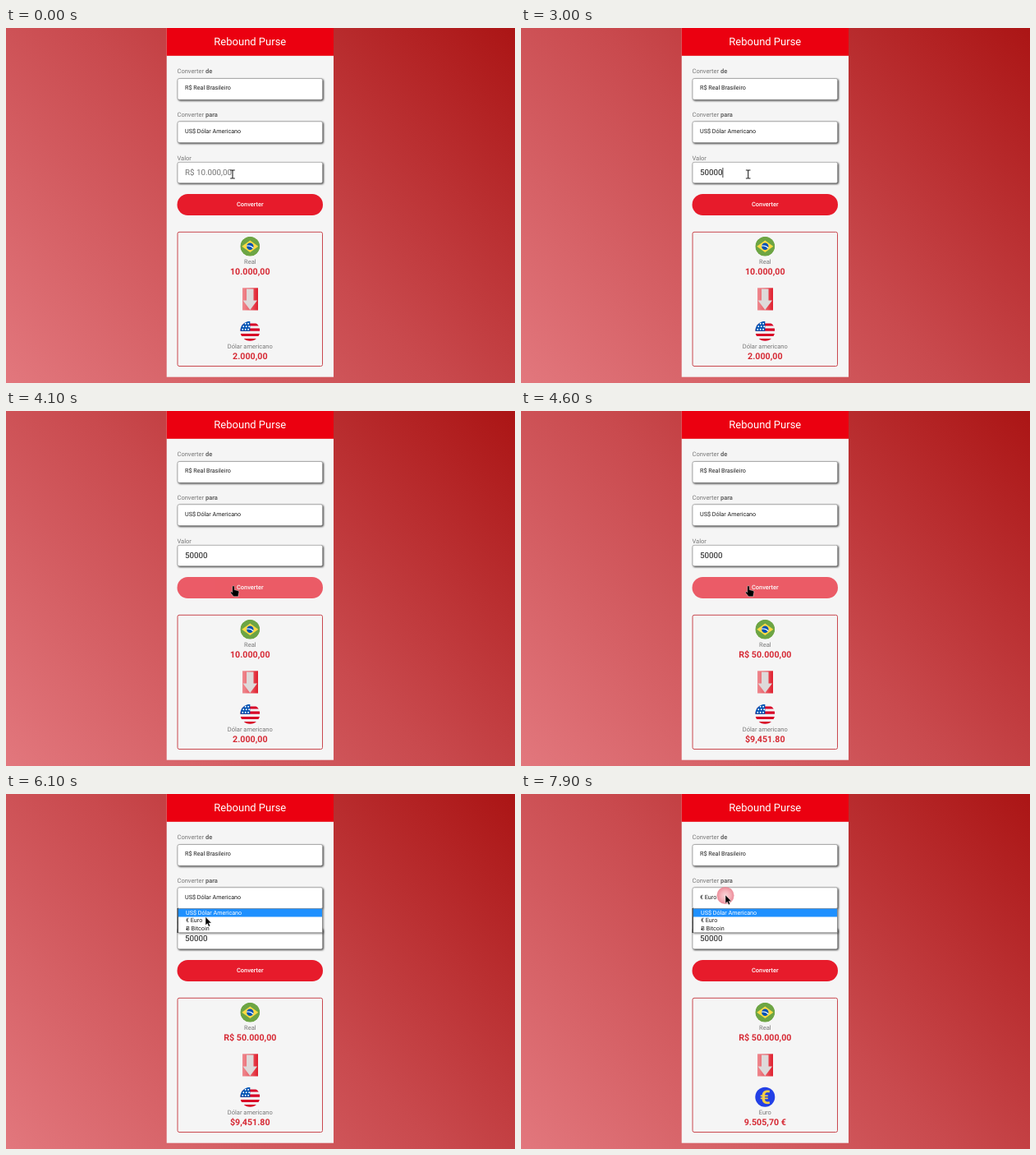
These frames come from a looping animation (620 px wide and 432 px high, 8000 ms). An HTML page:

```html
<!DOCTYPE html>
<html lang="pt-BR">
<head>
<meta charset="utf-8">
<title>Rebound Purse</title>
<style>
html, body { margin: 0; width: 100%; height: 100%; overflow: hidden; }
body { background: linear-gradient(45deg, #e2777d, #c94a4e 50%, #ab1515); }
svg { display: block; width: 620px; height: 432px; }
text { font-family: Roboto, sans-serif; text-rendering: geometricPrecision; }
.label { font-size: 7.5px; fill: #777; }
.label tspan { font-weight: 700; fill: #666; }
.choice { font-size: 7.2px; fill: #1c1c1c; }
.value { font-size: 9.8px; fill: #1c1c1c; }
.amount { font-size: 10.7px; font-weight: 700; fill: #d62a35; }
.mid { text-anchor: middle; }
.field { fill: #fff; stroke: #888; stroke-width: .6; filter: drop-shadow(1px 1px 1px rgba(0,0,0,.8)); }
</style>
</head>
<body>
<svg viewBox="0 0 620 432">
  <defs>
    <clipPath id="disc"><circle r="12"/></clipPath>
    <linearGradient id="arrowFill">
      <stop stop-color="#ef8a90"/><stop offset=".5" stop-color="#e9616a"/><stop offset="1" stop-color="#e01f2e"/>
    </linearGradient>
    <radialGradient id="rippleFill">
      <stop stop-color="#f9ced2"/><stop offset=".55" stop-color="#f3a5ae"/><stop offset="1" stop-color="#e97888"/>
    </radialGradient>
  </defs>

  <rect x="195.7" width="203.3" height="424.7" fill="#f5f5f5"/>
  <rect x="195.7" width="203.3" height="33.8" fill="#eb0010"/>
  <text class="mid" x="297.3" y="21.3" font-size="13" fill="#fff">Rebound Purse</text>

  <text class="label" x="208.5" y="55.3">Converter <tspan>de</tspan></text>
  <rect class="field" x="209" y="61.5" width="176.6" height="25.7" rx="2"/>
  <text class="choice" x="218" y="75.4">R$ Real Brasileiro</text>

  <text class="label" x="208.5" y="107.6">Converter <tspan>para</tspan></text>
  <rect class="field" x="209" y="113.8" width="176.6" height="25.7" rx="2"/>
  <text class="choice" id="target" x="218" y="128.2"></text>

  <text class="label" x="208.5" y="160.7">Valor</text>
  <rect class="field" x="209" y="163.3" width="176.6" height="25.4" rx="2"/>
  <text class="value" id="value" x="218" y="179.2"></text>
  <rect id="caret" y="170" width=".8" height="12" fill="#111"/>

  <g id="button">
    <rect x="208.5" y="202" width="177.5" height="26" rx="13" fill="#e71b2b"/>
    <text class="mid" x="297.3" y="217.3" font-size="7.4" font-weight="500" fill="#fff">Converter</text>
  </g>

  <rect x="209" y="248.3" width="176.5" height="163.2" rx="2" fill="none" stroke="#c9474e"/>
  <g transform="translate(297.3 265.8)" clip-path="url(#disc)">
    <circle r="12" fill="#6da544"/>
    <path d="M-10 0L0-7.2L10 0L0 7.2Z" fill="#ffda44"/>
    <circle r="4.2" fill="#0052b4"/>
    <path d="M-4.1-.6Q1-1.6 3.8 2" fill="none" stroke="#fff" stroke-width="1.2"/>
  </g>
  <text class="label mid" x="297.3" y="287.2">Real</text>
  <text class="amount mid" id="from" x="297.3" y="299.8"></text>

  <rect x="288" y="316.3" width="19" height="27.2" fill="url(#arrowFill)"/>
  <path d="M293 317.5H301.5V331.5H306L297.3 343L288.6 331.5H293Z" fill="#dedada"/>

  <g id="dollar" transform="translate(297.3 368.8)" clip-path="url(#disc)">
    <circle r="12" fill="#f2f2f2"/>
    <path d="M-12-7.8H12M-12-1.6H12M-12 4.7H12M-12 10.9H12" stroke="#d80027" stroke-width="3.2"/>
    <rect x="-12" y="-12" width="12" height="12" fill="#0052b4"/>
    <path id="stars" stroke="#fff" stroke-width="1.9" stroke-linecap="round"/>
  </g>
  <g id="euro" transform="translate(297.3 368.8)">
    <circle r="12" fill="#2340e6"/>
    <text class="mid" y="8.2" font-size="23" font-weight="700" fill="#f4cf45">€</text>
  </g>
  <text class="label mid" id="currency" x="297.3" y="390.2"></text>
  <text class="amount mid" id="to" x="297.3" y="402.6"></text>

  <g id="menu">
    <rect x="209.3" y="139.6" width="176" height="29.2" fill="#fff" stroke="#777" stroke-width=".6"
          style="filter:drop-shadow(1px 1px 1px rgba(0,0,0,.5))"/>
    <rect x="208.5" y="139" width="1.2" height="30" fill="#222"/>
    <rect id="marker" x="209.8" width="175.2" height="9.8" fill="#1e90ff"/>
    <text class="choice" x="219" y="147">US$ Dólar Americano</text>
    <text class="choice" x="219" y="156.4">€ Euro</text>
    <text class="choice" x="219" y="165.6">Ƀ Bitcoin</text>
  </g>

  <circle id="ripple" fill="url(#rippleFill)"/>
  <g id="cursor">
    <path id="beam" d="M-2.8-5H-.7L0-4.5L.7-5H2.8M0-4.5V4.5M-2.8 5H-.7L0 4.5L.7 5H2.8" fill="none" stroke="#222" stroke-width="1.1"/>
    <path id="hand" d="M-1.3 1Q0-.8 1.3 1V5L5.8 6.1Q7 6.5 6.8 8L6 11.3V13.2H.2L-3.4 8.6Q-3.6 7-2.2 7.2L-1.3 8.2Z" fill="#000" stroke="#fff" stroke-width=".4" transform="translate(0 .6)"/>
    <path id="arrow" d="M0 0V10.2L2.3 8.1L3.9 11.7L5.6 10.9L4.1 7.4H7.2Z" fill="#000" stroke="#fff" stroke-width=".4"/>
  </g>
</svg>
<script>
const LOOP = 8000, TICK = 100;
const el = {};
document.querySelectorAll('svg [id]').forEach(node => el[node.id] = node);

// Step tables: [start ms, value]
const typed = [[0, ''], [1400, '5'], [1800, '50'], [2000, '500'], [2300, '5000'], [2600, '50000']];
const pointer = [[0, 'beam'], [3400, 'arrow'], [3500, 'hand'], [5000, 'beam'], [5200, 'hand'],
  [5600, 'arrow'], [7000, 'beam'], [7500, 'hand'], [7800, 'arrow']];
const caretOn = [[0, false], [600, true], [3900, false]];
const menuOpen = [[0, false], [5600, true], [6900, false], [7800, true]];
const marked = [[0, 0], [6300, 1], [7800, 0]];
const results = [
  [0, { from: '10.000,00', to: '2.000,00' }],
  [4300, { from: 'R$ 50.000,00', to: '$9,451.80' }],
  [6900, { from: 'R$ 50.000,00', to: '9.505,70 €', euro: true }]
];
const clicks = [500, 4200, 5500, 6800, 7800];
const rippleSteps = [[6, .9], [10.5, .85], [13.5, .55], [16, .25]];

// Eased tracks: [ms, ...values]
const path = [[0, 276, 178], [2900, 276, 178], [3000, 276.7, 178], [3800, 277, 212], [4800, 277, 212],
  [5300, 245, 127], [5500, 247, 123], [5900, 247, 123], [6100, 243, 149.5], [6200, 243, 149.5],
  [6500, 242, 153], [6900, 242, 153], [7300, 316.5, 163.5], [7700, 249, 123], [8000, 249, 123]];
const buttonFade = [[0, 1], [3400, 1], [3700, .7], [4800, .7], [5100, 1], [8000, 1]];

const pick = (steps, t) => steps.filter(s => s[0] <= t).pop()[1];

function at(track, t) {
  const i = track.findIndex(k => k[0] > t);
  const a = track[i - 1], b = track[i];
  const p = (t - a[0]) / (b[0] - a[0]);
  const eased = p * p * (3 - 2 * p);
  return a.slice(1).map((v, n) => v + (b[n + 1] - v) * eased);
}

const show = (node, on) => node.style.display = on ? '' : 'none';

function set(node, attrs) {
  for (const name in attrs) node.setAttribute(name, attrs[name]);
}

let stars = '';
for (let row = 0; row < 3; row++)
  for (let col = 0; col < 3; col++)
    stars += `M${-9 + col * 3.4 + (row % 2)} ${-9 + row * 3.5}h.01`;
el.stars.setAttribute('d', stars);

function render(t) {
  const text = pick(typed, t);
  el.value.textContent = text || 'R$ 10.000,00';
  el.value.style.fill = text ? '' : '#757575';
  set(el.caret, { x: 218 + text.length * 5.5 });
  show(el.caret, pick(caretOn, t));

  const result = pick(results, t);
  el.from.textContent = result.from;
  el.to.textContent = result.to;
  el.currency.textContent = result.euro ? 'Euro' : 'Dólar americano';
  el.target.textContent = result.euro ? '€ Euro' : 'US$ Dólar Americano';
  show(el.euro, result.euro);
  show(el.dollar, !result.euro);
  set(el.button, { opacity: at(buttonFade, t)[0] });

  show(el.menu, pick(menuOpen, t));
  const row = pick(marked, t);
  set(el.marker, { y: 139.7 + row * 9.4 });
  el.menu.querySelectorAll('text').forEach((option, i) => option.style.fill = i === row ? '#fff' : '');

  const [x, y] = at(path, t);
  set(el.cursor, { transform: `translate(${x} ${y})` });
  const kind = pick(pointer, t);
  for (const name of ['beam', 'hand', 'arrow']) show(el[name], name === kind);

  const start = clicks.find(c => t >= c && t < c + rippleSteps.length * TICK);
  show(el.ripple, start !== undefined);
  if (start !== undefined) {
    const [r, opacity] = rippleSteps[(t - start) / TICK];
    set(el.ripple, { cx: x, cy: y + .5, r, opacity });
  }
}

const origin = performance.now();
function frame() {
  const t = (performance.now() - origin) % LOOP;
  render(Math.floor(t / TICK) * TICK);
  requestAnimationFrame(frame);
}
frame();
</script>
</body>
</html>
```
